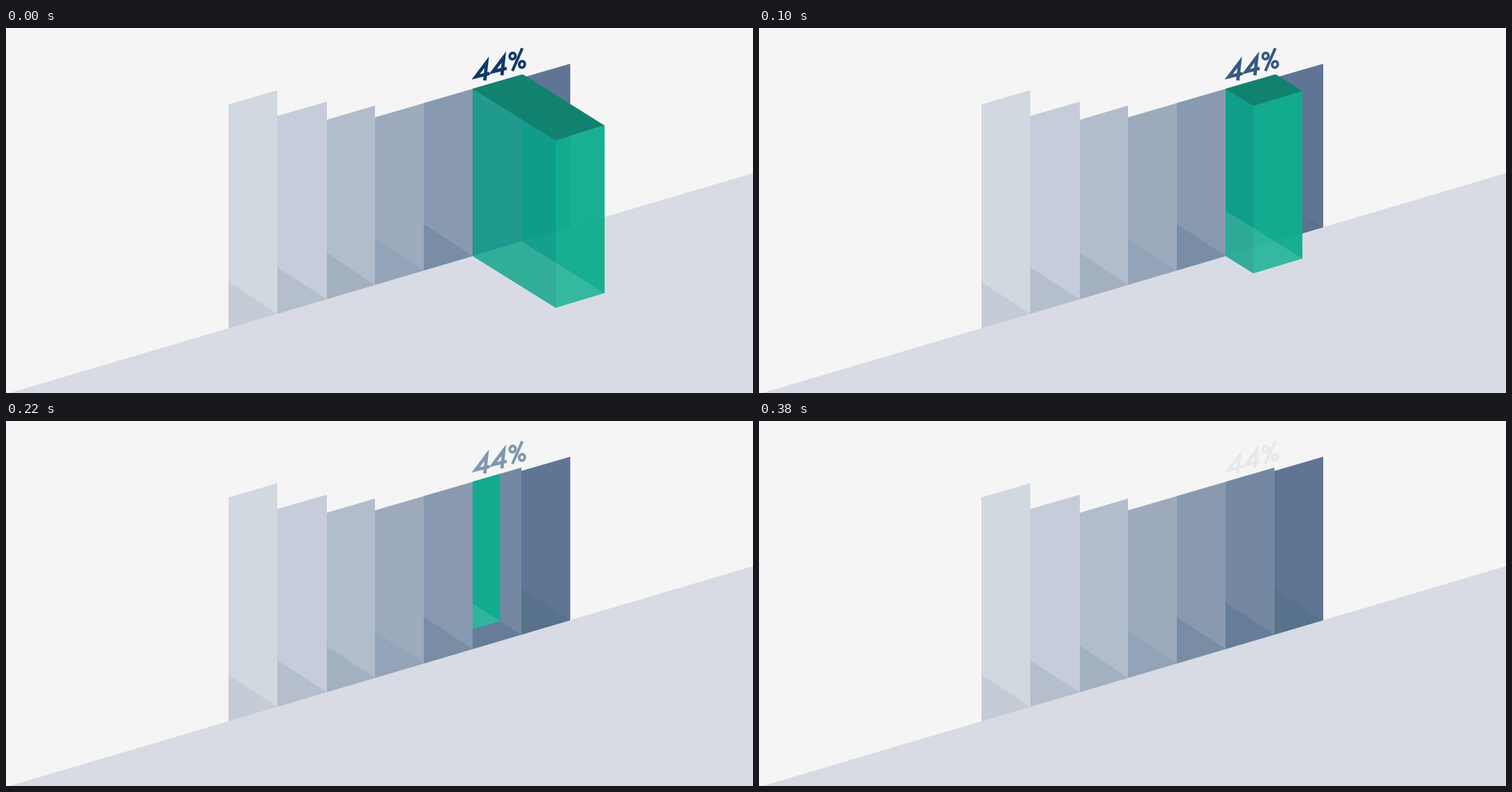
A matplotlib script for the animation above (420 ms loop, 1071 by 523 pixels).

```python
import numpy as np
import matplotlib.pyplot as plt
from matplotlib.animation import FuncAnimation
from matplotlib.patches import Ellipse, Polygon
from matplotlib.path import Path

W, H, DPI = 1071, 523, 64
FRAMES, INTERVAL = 21, 20
PX = 72 / DPI  # points per pixel

SKY, GROUND = "#f5f5f5", "#d8dbe4"
EDGES = [319, 389, 460, 529, 599, 669, 739, 809]
TOPS = [109.5, 126, 131.5, 128, 107.5, 87, 71.5]
BAR_COLORS = ["#d2d8e0", "#c6ccd9", "#b1bdcc", "#9caabc",
              "#8999b0", "#7489a1", "#607594"]
SHADE_COLORS = ["#c6ccd5", "#b4bfcb", "#a3b0c0", "#93a4b9",
                "#798da4", "#677c9a", "#59728b"]

# Box geometry: it slides along a diagonal through the sixth bar.
SLOT_X, SLOT_TOP = 668.5, 86.5
SLOPE, HEIGHT, DEPTH = 0.623, 240, 119.3
FACE = np.array([70.3, -21.2])
BACKWARD = np.array([-DEPTH, -DEPTH * SLOPE])
DOWN = np.array([0, HEIGHT])
slide = np.poly1d(np.polyfit(
    [0, 2, 5, 7, 11, 15, 19],
    [787.8, 755.3, 708.5, 681.3, 638.8, 610.4, 598], 4))

fig = plt.figure(figsize=(W / DPI, H / DPI), dpi=DPI, facecolor=SKY)
ax = fig.add_axes([0, 0, 1, 1])
ax.set_xlim(0, W)
ax.set_ylim(H, 0)
ax.axis("off")


def ground_y(x):
    return 523 - (x - 5) * 0.2955


def shape(points, color, alpha=1.0):
    return ax.add_patch(Polygon(points, closed=True, facecolor=color,
                                alpha=alpha, linewidth=0))


shape([(5, 523), (W, ground_y(W)), (W, H)], GROUND)
for left, right, top, bar, shade in zip(EDGES, EDGES[1:], TOPS,
                                        BAR_COLORS, SHADE_COLORS):
    low_left, low_right = (left, ground_y(left)), (right, ground_y(right))
    shape([(left, top), (right, top - 20.3), low_right, low_left], bar)
    shape([(left, ground_y(left) - 66.5), low_right, low_left], shade)

EMPTY = np.zeros((4, 2))
side = shape(EMPTY, "#0c9f89", 0.97)
front = shape(EMPTY, "#0fad8f", 0.96)
back = shape(EMPTY, BAR_COLORS[5], 0.17)
floor = shape(EMPTY, "#ffffff", 0.13)
lid = shape(EMPTY, "#128270")

opening = Path([(669, 87), (745, 64.9), (W, 64.9), (W, H), (669, H), (669, 87)])
for part in (side, front, back, floor, lid):
    part.set_clip_path(opening, ax.transData)

# Label strokes
FOUR = np.array([(686.4, 75.2), (689.2, 49), (673.4, 70), (693.2, 65.1)])
label = []


def stroke(points, width):
    xs, ys = np.transpose(points)
    label.extend(ax.plot(xs, ys, linewidth=width * PX, solid_capstyle="butt",
                         solid_joinstyle="miter"))


def ring(x, y):
    patch = Ellipse((x, y), 8, 9.2, angle=20, fill=False, linewidth=3.7 * PX)
    label.append(ax.add_patch(patch))


stroke(FOUR, 4.7)
stroke(FOUR + (24.6, -7.4), 4.7)
stroke([(740.2, 29), (726, 61.5)], 4)
ring(726.3, 40.2)
ring(739.8, 52.2)

INK = np.array([16, 57, 107]) / 255
PAPER = np.array([245, 245, 245]) / 255


def update(frame):
    step = min(frame, 19)
    x = slide(step)
    top_left = np.array([x, SLOT_TOP + SLOPE * (x - SLOT_X)])
    top_right = top_left + FACE
    low_left, low_right = top_left + DOWN, top_right + DOWN
    overlap = np.array([0.5, 0.3])

    front.set_xy([top_left, top_right, low_right, low_left])
    back.set_xy(front.get_xy() + BACKWARD)
    floor.set_xy([low_left, low_right, low_right + BACKWARD,
                  low_left + BACKWARD])
    side.set_xy([(SLOT_X, SLOT_TOP), top_left + overlap, low_left + overlap,
                 (SLOT_X, SLOT_TOP + HEIGHT)])
    lid.set_xy([(SLOT_X, 87), (741, 66.3), top_right, top_left])
    for part in (side, lid):
        part.set_visible(x > SLOT_X)

    fade = min(1, 1 - 0.055 * (step - 2))
    color = PAPER + (INK - PAPER) * fade
    for mark in label:
        mark.set_color(color)
    return [side, front, back, floor, lid, *label]


anim = FuncAnimation(fig, update, frames=FRAMES, interval=INTERVAL,
                     repeat=True, repeat_delay=0, blit=False)
plt.show()
```
